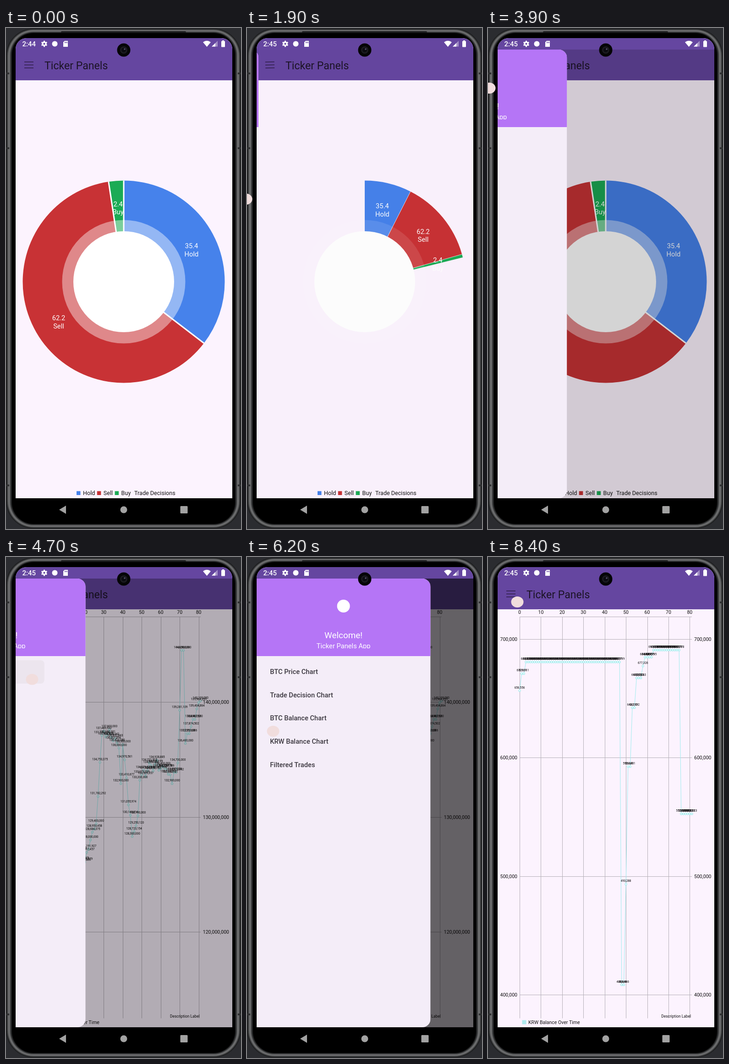
An HTML page with a canvas for the animation above (8500 ms loop, 513 px wide and 1092 px high).

```html
<!DOCTYPE html>
<html lang="en">
<head>
<meta charset="utf-8">
<title>Ticker Panels</title>
<style>
html, body { margin: 0; width: 100%; height: 100%; overflow: hidden; background: #2b2c30; }
canvas { display: block; width: 513px; height: 1092px; }
</style>
</head>
<body>
<canvas id="stage"></canvas>
<script>
const W = 513, H = 1092, LOOP = 8500, STEP = 100;
const canvas = document.getElementById('stage');
const ratio = window.devicePixelRatio || 1;
canvas.width = W * ratio;
canvas.height = H * ratio;
const g = canvas.getContext('2d');

const APP = 'Ticker Panels';
const SCREEN = { x: 21, y: 22, w: 473, h: 1003 };
const DRAWER = { w: 380, top: 47, h: 978, ms: 600, row: 50.7 };
const BLUE = '#4682eb', RED = '#c83235', GREEN = '#1bab55', CYAN = '#9eecee';
const INK = '#111', WHITE = '#fff', PURPLE = '#6546a0';
const PIE_MS = 1095;

const menu = ['BTC Price Chart', 'Trade Decision Chart', 'BTC Balance Chart', 'KRW Balance Chart', 'Filtered Trades'];
const slices = [[35.4, 'Hold', BLUE], [62.2, 'Sell', RED], [2.4, 'Buy', GREEN]];

// The drawer opens, then a row is tapped and it closes
const visits = [
  { open: 550, close: 1544, row: 1 },
  { open: 3842, close: 4600, row: 0 },
  { open: 5750, close: 6350, row: 3 },
  { open: 6850, close: 7277.5, row: 2 }
];
const [toPie, toPrices, toBalance] = visits.map(v => v.close);

const burger = [64, 98];
const rowSpot = n => [56 + 22 * (n === 2 ? 2 : n % 2 * 0), 268 + DRAWER.row * n];
const pointerStops = [
  [0, 140, -20], [500, ...burger], [600, ...burger], [1150, ...rowSpot(1)], [toPie, ...rowSpot(1)],
  [1900, -2, 373], [2000, -30, 373], [3300, -30, 98], [3800, ...burger], [3900, 3, 131],
  [toPrices, ...rowSpot(0)], [5400, 86, 229], [5750, ...burger], [toBalance, ...rowSpot(3)],
  [6850, ...burger], [7250, ...rowSpot(2)], [7350, ...rowSpot(2)], [8300, ...burger], [LOOP, ...burger]
];

const clamp = v => Math.max(0, Math.min(1, v));
const mix = (a, b, u) => a + (b - a) * u;
const easeOut = u => 1 - (1 - clamp(u)) ** 5;
const easeInOut = u => u < 0.5 ? 2 * u * u : 1 - 2 * (1 - u) ** 2;
const commas = v => Math.round(v).toLocaleString('en-US');

function seeded(seed) {
  return () => (seed = seed * 16807 % 2147483647) / 2147483647;
}

// Values of sorted [position, ...values] stops at a position
function along(stops, at, ease = u => u) {
  const i = Math.max(1, stops.findIndex(s => s[0] >= at));
  const a = stops[i - 1], b = stops[i];
  const u = ease(clamp((at - a[0]) / (b[0] - a[0])));
  return a.slice(1).map((v, k) => mix(v, b[k + 1], u));
}

// Turning points in millions, with small jitter between them
const turns = [
  [0, 115.4], [1, 123.2], [4, 125.5], [6, 124.4], [9, 130], [10, 124.1], [13, 128.3], [19, 126],
  [23, 128], [26, 129.4], [29, 137.1], [33, 137.6], [38, 136], [39, 132.9], [40, 136.3], [45, 128.3],
  [48, 130.1], [49, 133.2], [55, 134.5], [61, 134.4], [66, 132.9], [69, 134.7], [71, 144.5],
  [72, 144.5], [73, 136.4], [81, 140.1]
];
const random = seeded(41);
const prices = Array.from({ length: 82 }, (_, i) => {
  const onTurn = turns.some(s => s[0] === i);
  return (along(turns, i)[0] + (onTurn ? 0 : random() - 0.5)) * 1e6;
});

// Steps as [repeat, thousands]
const balances = [
  [1, 656.556], [2, 670.911], [45, 680.719], [2, 408.446], [1, 493.288], [2, 592.481], [2, 642.192],
  [3, 667.263], [1, 677.326], [4, 684.795], [13, 690.778], [6, 552.623]
].flatMap(([n, v]) => Array(n).fill(v * 1e3));

const priceChart = {
  data: prices, left: 89, dx: 4.145, first: 140e6, gap: 10e6, rows: 3, y0: 316, dy: 250.6,
  legend: 'BTC Price Over Time'
};
const balanceChart = {
  data: balances, left: 69, dx: 4.642, first: 7e5, gap: 1e5, rows: 4, y0: 179, dy: 258.4,
  legend: 'KRW Balance Over Time'
};

function drawerAt(t) {
  const v = visits.findLast(v => t > v.open);
  if (!v) return 0;
  return t > v.close ? 1 - easeOut((t - v.close) / DRAWER.ms) : easeOut((t - v.open) / DRAWER.ms);
}

function rect(x, y, w, h, color) { g.fillStyle = color; g.fillRect(x, y, w, h); }

function round(x, y, w, h, r, color) {
  g.fillStyle = color;
  g.beginPath(); g.roundRect(x, y, w, h, r); g.fill();
}

function disc(x, y, r, color) {
  g.fillStyle = color;
  g.beginPath(); g.arc(x, y, r, 0, Math.PI * 2); g.fill();
}

function poly(points, color) {
  g.fillStyle = color;
  g.beginPath(); points.forEach(p => g.lineTo(...p)); g.fill();
}

function line(x0, y0, x1, y1, color, width = 1) {
  g.strokeStyle = color; g.lineWidth = width;
  g.beginPath(); g.moveTo(x0, y0); g.lineTo(x1, y1); g.stroke();
}

function text(s, x, y, size, color, align = 'left', weight = 400) {
  g.font = `${weight} ${size}px Roboto, sans-serif`;
  g.textAlign = align; g.fillStyle = color;
  g.fillText(s, x, y);
}

function drawPhone() {
  rect(0, 0, W, H, '#2b2c30');
  for (let i = 0; i < 13; i++) {
    const shade = 28 + 84 * Math.sin(Math.PI * i / 12) ** 2;
    round(i, 1 + i * 0.8, W - 2 * i, 1090 - 1.6 * i, 60 - i, `rgb(${shade},${shade + 1},${shade + 2})`);
  }
  round(13, 11, W - 26, 1070, 47, '#000');
  round(120, 7, 273, 4, 2, '#191a1b');
  for (const y of [97, 260, 995]) {
    rect(0, y, 7, 4, '#2f3031');
    rect(W - 7, y, 7, 4, '#2f3031');
  }
}

function drawNav() {
  const c = '#a3a3a3';
  poly([[116, 1050], [131, 1041], [131, 1059]], c);
  disc(257, 1050, 7.5, c);
  round(380.5, 1042, 16, 16, 1.5, c);
}

function drawStatus(t) {
  text(t < 1600 ? '2:44' : '2:45', 35.5, 40, 15, WHITE, 'left', 500);
  g.save();
  g.translate(83.5, 34.5);
  for (let i = 0; i < 6; i++) {
    g.rotate(Math.PI / 3);
    rect(-1.5, -6.7, 3, 4, WHITE);
  }
  disc(0, 0, 5.1, WHITE);
  disc(0, 0, 2.1, PURPLE);
  g.restore();
  disc(106.5, 34.5, 6, WHITE);
  poly([[128, 28], [135, 28], [135, 41], [125, 41], [125, 31]], WHITE);
  for (let i = 0; i < 3; i++) rect(128 + 2.3 * i, 30, 1.2, 3, PURPLE);
  g.fillStyle = WHITE;
  g.beginPath(); g.moveTo(438.5, 41); g.lineTo(430, 31);
  g.quadraticCurveTo(438.5, 24.5, 447, 31); g.fill();
  poly([[449, 40.5], [462, 40.5], [462, 28]], 'rgba(255,255,255,.4)');
  poly([[449, 40.5], [457, 40.5], [457, 33]], WHITE);
  rect(472, 27, 4, 2, WHITE);
  round(470, 28.5, 8, 13, 1, WHITE);
}

function drawBar(open) {
  rect(SCREEN.x, SCREEN.y, SCREEN.w, 92, PURPLE);
  g.save();
  g.translate(50, 80.5);
  g.rotate(-Math.PI * open);
  for (const y of [-6.5, 0, 6.5]) line(-10, y, 10, y, 'rgba(30,18,45,.6)', 2);
  g.restore();
  text(APP, 84, 90, 23.1, '#1c1426');
}

function drawPie(phase) {
  const cx = 257, cy = 553, R = 220.5;
  const angle = v => (v / 50 * phase - 0.5) * Math.PI;
  const spot = (a, r) => [cx + r * Math.cos(a), cy + r * Math.sin(a)];
  let sum = 0;
  const parts = slices.map(([value, name, color]) => {
    const from = angle(sum), mid = angle(sum + value / 2);
    sum += value;
    return { value, name, color, from, mid, to: angle(sum) };
  });
  for (const p of parts) {
    g.fillStyle = p.color;
    g.beginPath(); g.moveTo(cx, cy); g.arc(cx, cy, R, p.from, p.to); g.fill();
  }
  parts.forEach((p, i) => {
    if (i || phase === 1) line(cx, cy, ...spot(p.from, R), WHITE, Math.max(0.7, 3 * phase));
  });
  disc(cx, cy, 134.5, `rgba(255,255,255,${0.42 * Math.max(phase, 0.25)})`);
  disc(cx, cy, 110, WHITE);
  for (const p of parts) {
    const [x, y] = spot(p.mid, 165);
    text(p.value.toFixed(1), x, y + 0.5, 14.7, WHITE, 'center');
    text(p.name, x, y + 18, 14.7, WHITE, 'center');
  }
  let x = 154;
  for (const [, name, color] of slices) {
    rect(x, 1009.5, 8.5, 8.5, color);
    text(name, x + 14, 1018, 12.6, INK);
    x += 18.5 + g.measureText(name).width;
  }
  text('Trade Decisions', 280, 1018, 12.6, INK);
}

function drawChart({ data, left, dx, first, gap, rows, y0, dy, legend }) {
  const px = i => left + i * dx;
  const py = v => y0 + (first - v) / gap * dy;
  const right = px(81), top = 130.5, grid = '#b5b0b8';
  for (let i = 0; i <= 80; i += 10) {
    const x = Math.round(px(i)) + 0.5;
    text(i, px(i), 124, 10.5, INK, 'center');
    line(x, top, x, 1005.5, grid);
  }
  line(left, top, right, top, grid);
  for (let n = 0; n < rows; n++) {
    const v = first - n * gap, y = Math.round(py(v)) + 0.5;
    line(left, y, right, y, grid);
    text(commas(v), left - 5, y + 3.5, 10.5, INK, 'right');
    text(commas(v), right + 5, y + 3.5, 10.5, INK);
  }
  g.strokeStyle = CYAN; g.lineWidth = 1;
  g.beginPath(); data.forEach((v, i) => g.lineTo(px(i), py(v))); g.stroke();
  data.forEach((v, i) => {
    disc(px(i), py(v), 2.6, CYAN);
    disc(px(i), py(v), 1.4, WHITE);
  });
  data.forEach((v, i) => text(commas(v), px(i), py(v) - 4.7, 6.3, '#000', 'center'));
  text('Description Label', right - 2, 1004, 8.4, INK, 'right');
  rect(left + 5.5, 1009.5, 9, 9, '#aeeaee');
  text(legend, left + 19, 1018, 10.5, INK);
}

function drawRipple(t) {
  for (const { close, row } of visits) {
    const age = t - close + 100;
    if (age < 0 || age > 500) continue;
    const edge = Math.min(DRAWER.w, rowSpot(row)[0] - 33 + age * 1.335);
    const fade = 1 - clamp((age - 200) / 300);
    round(-8, 225 + row * DRAWER.row, edge + 8, 51, 8, `rgba(60,50,40,${0.045 * fade})`);
  }
}

function drawDrawer(open, t) {
  if (open < 0.002) return;
  g.save();
  g.translate(SCREEN.x - DRAWER.w * (1 - open), 0);
  g.beginPath(); g.roundRect(0, DRAWER.top, DRAWER.w, DRAWER.h, [0, 18, 18, 0]); g.clip();
  rect(0, DRAWER.top, DRAWER.w, DRAWER.h, '#f4edf8');
  rect(0, DRAWER.top, DRAWER.w, 169, '#b575f6');
  disc(190, 107, 14, WHITE);
  text('Welcome!', 190, 177, 18.9, WHITE, 'center');
  g.save();
  g.beginPath(); g.rect(0, 180, DRAWER.w, 19); g.clip();
  text(APP + ' App', 190, 198.5, 14.7, WHITE, 'center');
  g.restore();
  drawRipple(t);
  menu.forEach((name, i) => text(name, 29.5, 255 + i * DRAWER.row, 14.7, '#3b373f', 'left', 500));
  g.restore();
}

function drawCamera() {
  disc(257, 48, 14.5, '#050506');
  disc(257, 48, 8, '#1b1b20');
  disc(257, 48, 5, '#0b0b10');
  disc(259, 46, 1.8, '#55506a');
}

function drawPointer(t) {
  const [x, y] = along(pointerStops, t, easeInOut);
  g.fillStyle = '#f1dddd';
  g.beginPath(); g.ellipse(x, y, 13.5, 12, 0, 0, Math.PI * 2); g.fill();
}

function draw(t) {
  g.setTransform(ratio, 0, 0, ratio, 0, 0);
  drawPhone();
  const open = drawerAt(t), dim = 0.6 * drawerAt(t - 20);

  g.save();
  g.beginPath();
  g.roundRect(SCREEN.x, SCREEN.y, SCREEN.w, SCREEN.h, [24, 24, 0, 0]); g.clip();
  rect(SCREEN.x, SCREEN.y, SCREEN.w, SCREEN.h, '#fcf3fe');
  drawBar(open);
  if (t < toPrices) drawPie(t < toPie ? 1 : easeInOut(clamp((t - toPie) / PIE_MS)));
  else drawChart(t < toBalance ? priceChart : balanceChart);
  rect(SCREEN.x, DRAWER.top, SCREEN.w, DRAWER.h, `rgba(0,0,0,${dim})`);
  drawDrawer(open, t);
  drawStatus(t);
  g.restore();

  drawNav();
  drawCamera();
  drawPointer(t);
}

const start = performance.now();
function tick() {
  const t = (performance.now() - start) % LOOP;
  draw(Math.floor(t / STEP) * STEP);
  requestAnimationFrame(tick);
}
tick();
</script>
</body>
</html>
```
